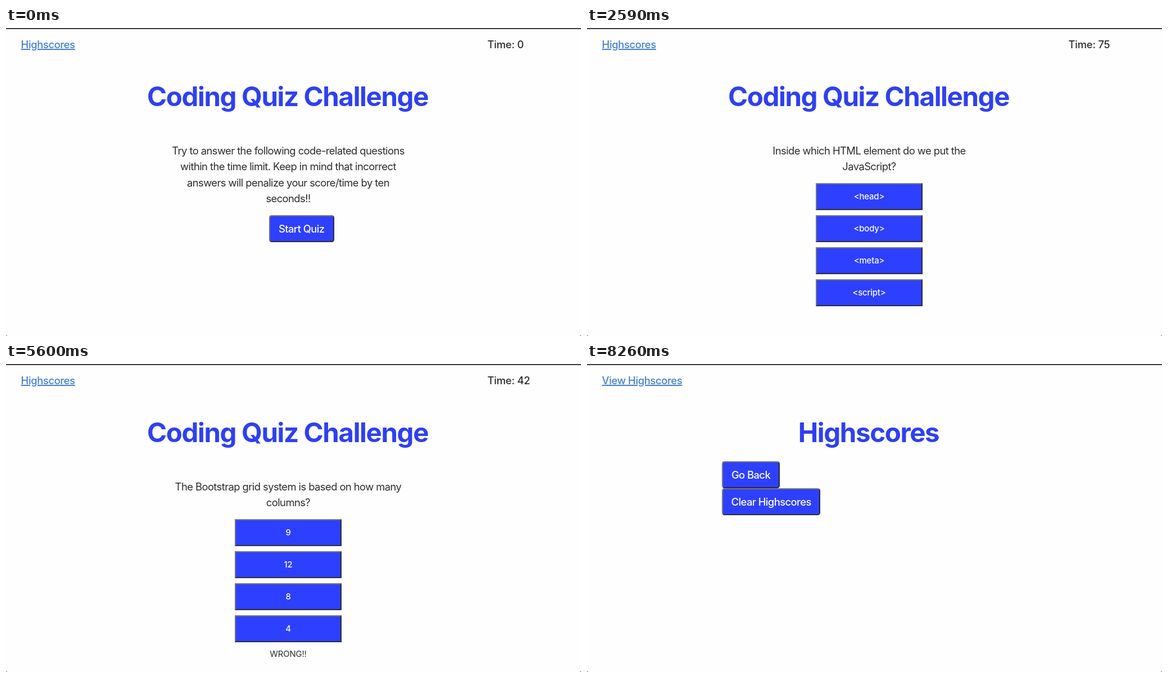
Recreate the animation shown at these times as an HTML page. Size 1023 by 548 pixels, loop 8680 ms.

```html
<!DOCTYPE html>
<html lang="en">
<head>
<meta charset="utf-8">
<title>Coding Quiz Challenge</title>
<style>
  html, body { margin: 0; width: 100%; height: 100%; overflow: hidden; background: #fff; }
  #stage {
    position: relative; width: 1023px; height: 548px; overflow: hidden;
    font: 400 18.4px/28.5px Inter, sans-serif; font-optical-sizing: none;
    letter-spacing: -.031em; color: #2b2c2f; background: #fefefe;
  }
  #stage div { position: absolute; white-space: nowrap; box-sizing: border-box; }
  #stage .edge { left: 0; top: 0; width: 100%; height: 2px; background: #3d3d3f; }
  #stage .corner { bottom: 0; width: 2px; height: 1px; background: #777; }
  #stage .head { top: 14.6px; font-weight: 500; letter-spacing: -.02em; }
  #stage .link {
    left: 26.6px; color: #427fd6; text-decoration: underline;
    text-decoration-thickness: 1.5px; text-underline-offset: 1px;
  }
  #stage .time { left: 856.5px; letter-spacing: -.012em; }
  #stage .mid { left: 0; width: 1004px; text-align: center; }
  #stage .title {
    left: -1px; top: 92.3px; font-size: 47.5px; line-height: 60px;
    font-weight: 700; letter-spacing: -.03em; color: #2e40f2;
  }
  #stage .text { top: 203.75px; }
  #stage .small { font-size: 14.9px; letter-spacing: -.012em; }
  #stage .btn {
    height: 48px; line-height: 44px; text-align: center; color: #fff; font-weight: 500;
    background: #2e40ff; border: 2px solid;
    border-color: #78787f #2b2b35 #2b2b35 #78787f;
  }
  #stage .round { border-radius: 4.6px; }
  #stage .focus { border-radius: 4px; border-color: #2f74e0; }
</style>
</head>
<body>
<div id="stage"></div>
<script>
const LOOP = 8680;
const stage = document.getElementById('stage');

const questions = [
  { lines: ['Inside which HTML element do we put the', 'JavaScript?'],
    choices: ['<head>', '<body>', '<meta>', '<script>'] },
  { lines: ['What does CSS stand for?'],
    choices: ['Computer', 'Creative', 'Cascading', 'Colorful'].map(w => w + ' Style Sheets'),
    result: 'WRONG!!' },
  { lines: ['The Bootstrap grid system is based on how many', 'columns?'],
    choices: ['9', '12', '8', '4'], result: 'WRONG!!' },
  { lines: ["How do you write 'Hello World' in an alert box?"],
    choices: ["msg('Hello World');", "alert('Hello World');",
              "alert: 'Hello World';", "msgBox('Hello World');"],
    result: 'CORRECT!' }
];
const intro = [
  'Try to answer the following code-related questions',
  'within the time limit. Keep in mind that incorrect',
  'answers will penalize your score/time by ten',
  'seconds!!'
];

// [start ms, value]
const screens = [[0, 'intro'], [1190, 0], [3150, 1], [4480, 2], [5740, 3], [7630, 'scores']];
const clock = [[0, 0], [2240, 75], [3290, 74], [4340, 58], [5390, 42], [6440, 41], [7490, 40]];
const focus = [[0, -1], [7210, 1]];

const at = (steps, t) => steps.filter(s => s[0] <= t).pop()[1];
const esc = s => String(s).replace(/&/g, '&amp;').replace(/</g, '&lt;');
const box = (cls, text = '', style = '') => `<div class="${cls}" style="${style}">${text}</div>`;
const button = (cls, text, x, y, w) =>
  box('btn ' + cls, esc(text), `left:${x}px;top:${y}px;width:${w}px`);
const frame = (link, title) =>
  box('edge') + box('corner', '', 'left:0') + box('corner', '', 'right:0') +
  box('head link', link) + box('mid title', title);
const paragraph = lines => box('mid text', lines.map(esc).join('<br>'));

function questionView({ lines, choices, result }, focused) {
  const top = Math.floor(219 + 28.5 * lines.length);
  const buttons = choices.map((c, i) =>
    button(i === focused ? 'small focus' : 'small', c, 407, top + 57 * i, 190));
  const verdict = result ? box('mid small', result, `top:${top + 225.75}px`) : '';
  return paragraph(lines) + buttons.join('') + verdict;
}

function view(screen, time, focused) {
  if (screen === 'scores') {
    return frame('View Highscores', 'Highscores') +
      button('round', 'Go Back', 240, 173, 103) +
      button('round', 'Clear Highscores', 240, 220.6, 175.4);
  }
  const body = screen === 'intro'
    ? paragraph(intro) + button('round', 'Start Quiz', 468, 333, 115.5)
    : questionView(questions[screen], focused);
  return frame('Highscores', 'Coding Quiz Challenge') + box('head time', 'Time: ' + time) + body;
}

let shown = '';
function draw(now) {
  const t = now % LOOP;
  const state = [screens, clock, focus].map(steps => at(steps, t));
  const key = state.join();
  if (key !== shown) {
    shown = key;
    stage.innerHTML = view(...state);
  }
  requestAnimationFrame(() => draw(performance.now() - start));
}
const start = performance.now();
draw(0);
</script>
</body>
</html>
```
